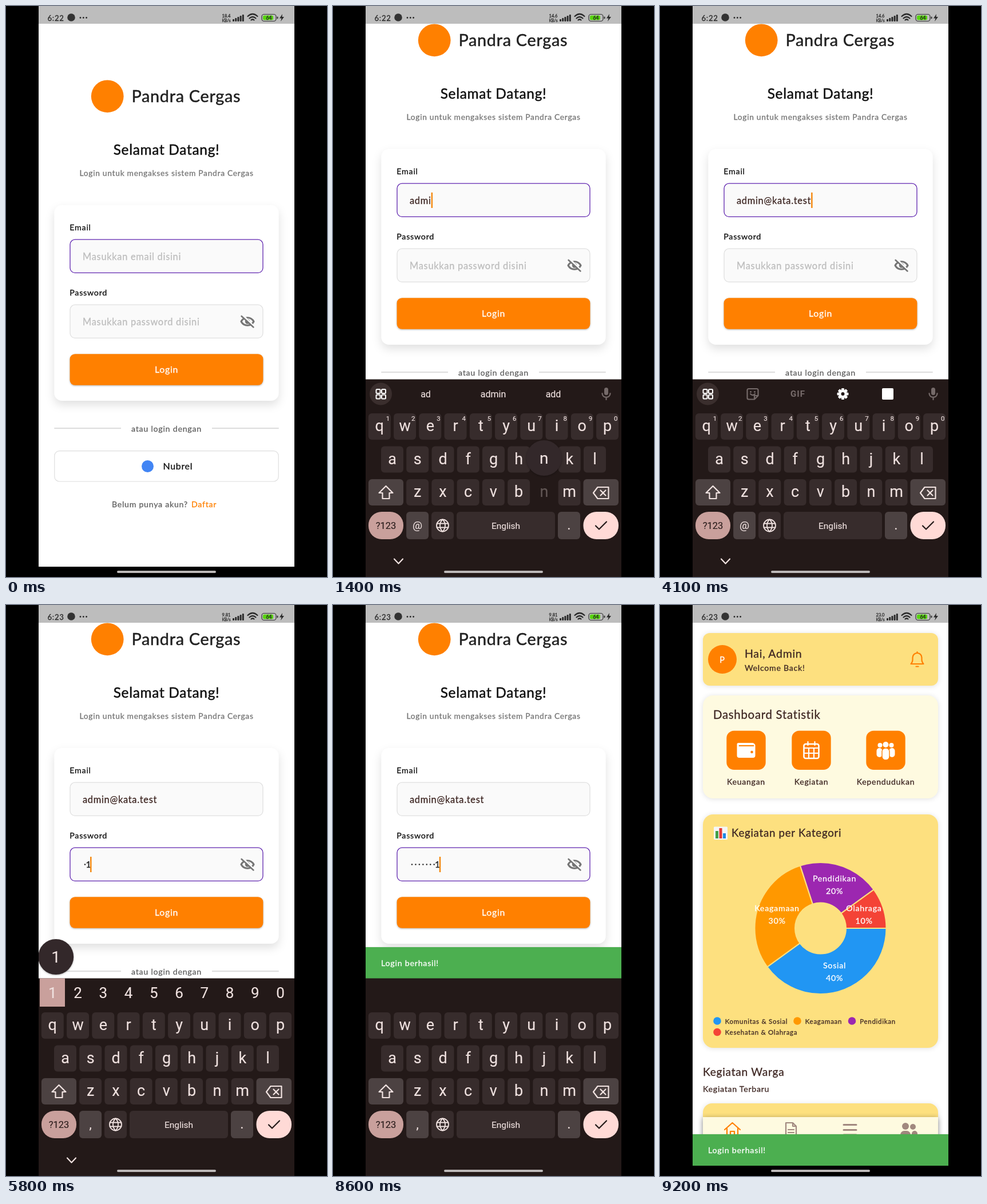
An HTML page that plays this animation: 561 by 998 pixels, repeating every 9.3 s.

```html
<!DOCTYPE html>
<html lang="id">
<head>
<meta charset="utf-8">
<title>Login</title>
<style>
  html, body { margin: 0; width: 100%; height: 100%; overflow: hidden; background: #000; }
  svg { display: block; width: 100%; height: 100%; }
  text { white-space: pre; stroke-width: .15; }
  .app { font-family: Lato, "Open Sans", sans-serif; letter-spacing: .045em; }
  .app text { stroke-width: .3; }
  .app .head { stroke-width: .5; }
  .keys { font-family: Roboto, "Noto Sans", sans-serif; }
  .mid { text-anchor: middle; }
  .line { fill: none; stroke-width: 2.2; stroke-linecap: round; stroke-linejoin: round; }
  .card { filter: drop-shadow(0 7px 8px rgba(0, 0, 0, .12)); }
  .soft { filter: drop-shadow(0 1px 4px rgba(0, 0, 0, .12)); }
  .lift { filter: drop-shadow(0 1px 1.5px rgba(0, 0, 0, .3)); }
</style>
</head>
<body>
<svg id="stage" viewBox="0 0 561 998" preserveAspectRatio="none"></svg>
<script>
const LOOP = 9300, STEP = 100;
const ORANGE = '#ff8000', YELLOW = '#fde07f', CREAM = '#fefae0', BROWN = '#3e2723';
const KEY = '#372c2c', KEY2 = '#4c4242', INK = '#f0e2e0', DIM = '#756a69', BOARD = '#231918', ROSE = '#c9a09c';
const PITCH = 44.25, BOARD_TOP = 652.5, DOT_PITCH = 6.45;
const BRAND = 'Pandra Cergas';

const text = (x, y, size, fill, str, attrs = '') =>
  `<text x="${x}" y="${y}" font-size="${size}" fill="${fill}" stroke="${fill}" ${attrs}>${str}</text>`;
const mid = (x, y, size, fill, str, attrs = '') => text(x, y, size, fill, str, `class="mid" ${attrs}`);
const rect = (x, y, w, h, r, fill, attrs = '') =>
  `<rect x="${x}" y="${y}" width="${w}" height="${h}" rx="${r}" fill="${fill}" ${attrs}/>`;
const dot = (x, y, r, fill, attrs = '') => `<circle cx="${x}" cy="${y}" r="${r}" fill="${fill}" ${attrs}/>`;
const line = (d, color, attrs = '') => `<path class="line" d="${d}" stroke="${color}" ${attrs}/>`;
const icon = (x, y, body) => `<g transform="translate(${x} ${y})">${body}</g>`;
const group = (id, body, attrs = '') => `<g id="${id}" ${attrs}>${body}</g>`;

/* Login page */
const field = (id, y) => rect(112, y, 337, 58.2, 8.6, '#fafafa', `id="${id}" stroke-width="1.3"`);

function loginPage() {
  const eye = line('M-11 0C-6-9 6-9 11 0C6 9-6 9-11 0Z', '#757575', 'style="stroke-width:3.2"') +
    dot(0, 0, 4.2, '#757575') +
    line('M-8-11L11 8', '#fafafa', 'style="stroke-width:3"') + line('M-10.5-9.5L10.5 10', '#757575', 'style="stroke-width:2.5"');
  return dot(177.2, 157.8, 28.4, ORANGE) +
    text(219.5, 168, 28.8, '#212121', BRAND, 'class="head"') +
    mid(280.5, 259.5, 24.4, '#111', 'Selamat Datang!', 'class="mid head"'.replace('class="mid head"', 'style="stroke-width:.5"')) +
    mid(280.5, 297, 13.8, '#757575', 'Login untuk mengakses sistem ' + BRAND) +
    rect(84.3, 348, 392.4, 342, 13.6, '#fff', 'class="card"') +
    text(111.3, 392, 14.3, '#111', 'Email') + field('emailBox', 408.2) +
    text(134, 443.5, 16.4, '#bdbdbd', 'Masukkan email disini', 'id="emailHint"') +
    text(134, 443.5, 16.4, BROWN, '', 'id="email"') +
    text(111.3, 506, 14.3, '#111', 'Password') + field('passBox', 522.2) +
    text(134, 557.5, 16.4, '#bdbdbd', 'Masukkan password disini', 'id="passHint"') +
    group('dots', '') + mid(0, 556.5, 15.5, '#212121', '1', 'id="lastDigit"') +
    icon(422, 551.5, eye) +
    rect(0, 0, 2.5, 27, 0, '#f58a12', 'id="caret"') +
    rect(111.6, 608.2, 337.8, 54.6, 9, ORANGE, 'class="lift"') +
    mid(280.5, 641, 15.9, '#fff', 'Login') +
    rect(84.3, 737.4, 116.7, 1.2, 0, '#c6c6c6') + rect(360, 737.4, 116.7, 1.2, 0, '#c6c6c6') +
    mid(280.5, 743.5, 14.3, '#616161', 'atau login dengan') +
    rect(84.8, 777.6, 391.4, 53.4, 8.6, '#fff', 'stroke="#dedede" stroke-width="1.2"') +
    dot(247.5, 804.5, 10.5, '#4285f4') + text(274.5, 810, 15.9, '#111', 'Nubrel') +
    text(185, 875.5, 14.2, '#616161', 'Belum punya akun?') +
    text(324, 875.5, 14.2, ORANGE, 'Daftar');
}

/* Dashboard page */
const slices = [
  ['Sosial', 40, '#2196f3', 305, 635],
  ['Keagamaan', 30, '#ff9800', 204.5, 535],
  ['Pendidikan', 20, '#9c27b0', 305, 483],
  ['Olahraga', 10, '#f44336', 356.5, 535]
];

function donut() {
  let start = 0, rings = '', gaps = '', labels = '';
  for (const [name, part, color, x, y] of slices) {
    rings += `<circle cx="280.5" cy="565" r="79.75" fill="none" stroke="${color}" stroke-width="68.5"
      pathLength="100" stroke-dasharray="${part} ${100 - part}" stroke-dashoffset="${-start}"/>`;
    gaps += `<path d="M44 0H116" stroke="${YELLOW}" stroke-width="2.2"
      transform="translate(280.5 565) rotate(${start * 3.6})"/>`;
    labels += mid(x, y, 14.3, '#fff', name) + mid(x, y + 22, 14.3, '#fff', part + '%');
    start += part;
  }
  return rings + gaps + labels;
}

function dashboard() {
  const bell = line('M-11 8H11C7 4 8 0 8-3C8-8 4-11 0-11S-8-8-8-3C-8 0-7 4-11 8ZM0-11V-13M-2 12.5H2', ORANGE);
  const wallet = rect(-16, -13, 30, 5, 2.5, '#fff') + rect(-16, -12, 32, 25, 4, '#fff') +
    line('M-12-8H13', ORANGE, 'style="stroke-width:1.8"') + dot(10, 3, 2.3, ORANGE);
  const calendar = rect(-13, -11, 26, 25, 3, 'none', 'stroke="#fff" stroke-width="2.6"') +
    line('M-12-4H12M-12 5H12M-4.5-4V13M4.5-4V13M-6-15V-9M6-15V-9', '#fff');
  const crowd = dot(-10, -9, 4, '#fff') + dot(10, -9, 4, '#fff') + dot(0, -10, 5, '#fff') +
    rect(-16, -4, 10, 16, 5, '#fff') + rect(6, -4, 10, 16, 5, '#fff') +
    rect(-6.5, -4, 13, 21, 6, '#fff', `stroke="${ORANGE}" stroke-width="1.4"`);
  const tiles = [[150.5, 'Keuangan', wallet], [264.5, 'Kegiatan', calendar], [394.5, 'Kependudukan', crowd]];
  const legend = [[100, 727, 0, 'Komunitas &amp; Sosial'], [240, 727, 1, 'Keagamaan'],
    [335.5, 727, 2, 'Pendidikan'], [100, 746.5, 3, 'Kesehatan &amp; Olahraga']];
  const bars = rect(94, 387.5, 24, 22.5, 1.5, '#f4f6f7') +
    rect(97, 395, 5, 13, 0, '#43a047') + rect(103.5, 390, 5, 18, 0, '#e53935') + rect(110, 399, 5, 9, 0, '#1e88e5');
  const grey = '#a1887f';
  const nav = line('M113 917L126.5 905L140 917M117 915V930H136V915M123 930V920H130V930', ORANGE) +
    line('M220 905H232L238 911V932H220ZM232 905V911H238M224 917H234M224 922H234', grey) +
    line('M321 908.5H343M321 917.5H343M321 926H343', grey, 'style="stroke-width:3"') +
    dot(429, 911, 6, grey) + dot(442, 912, 5, grey) +
    rect(420, 919, 18, 14, 7, grey) + rect(440, 919, 10, 14, 5, grey);

  return rect(57, 31, 447, 949, 0, '#fff') +
    rect(75, 49, 411, 92, 12, YELLOW, 'class="soft"') +
    dot(109, 95, 25, ORANGE) + mid(109, 100.5, 14.5, '#fff', 'P') +
    text(148, 92, 19.5, BROWN, 'Hai, Admin') + text(148, 115, 14.2, BROWN, 'Welcome Back!') +
    icon(449.5, 95, bell) +
    rect(75, 158, 411, 180, 18, CREAM, 'class="soft"') +
    text(93, 199, 20.4, BROWN, 'Dashboard Statistik') +
    tiles.map(([x, name, art]) => rect(x - 34.2, 219.7, 68.4, 68.4, 13, ORANGE) +
      icon(x, 254, art) + mid(x, 314, 14.1, BROWN, name)).join('') +
    rect(75, 366, 411, 408, 18, YELLOW, 'class="soft"') +
    bars + text(125, 405, 18.7, BROWN, 'Kegiatan per Kategori') + donut() +
    legend.map(([x, y, i, name]) => dot(x, y, 6.8, slices[i][2]) + text(x + 13.7, y + 4.5, 11.5, BROWN, name)).join('') +
    text(75, 823, 19.2, BROWN, 'Kegiatan Warga') + text(75, 851, 14.2, BROWN, 'Kegiatan Terbaru') +
    rect(75, 871, 411, 90, 16, YELLOW, 'class="soft"') +
    rect(75, 895, 411, 80, 0, CREAM, 'style="filter:drop-shadow(0 2px 5px rgba(0,0,0,.4))"') + nav;
}

/* Keyboard */
const spots = {};
const key = (ch, x, y, size = 27, h = 46, fill = KEY) => {
  spots[ch] = [x, y];
  return group('key-' + ch, rect(x - 19.5, y - h / 2, 39, h, 6, fill, 'class="cap"') + mid(x, y + size * .3, size, INK, ch));
};
const row = (chars, x, y) => [...chars].map((ch, i) => key(ch, x + i * PITCH, y)).join('');

function keyboard() {
  const digits = [...'1234567890'];
  const column = i => 81.3 + i * PITCH;
  digits.forEach((d, i) => { spots[d] = [column(i), 678]; });
  const grid = [[-8, -8], [1.5, -8], [-8, 1.5], [1.5, 1.5]]
    .map(([x, y]) => rect(x, y, 7, 7, 1.5, 'none', 'stroke="#fff" stroke-width="2"')).join('');
  const sticker = line('M-7-9H7Q9.5-9 9.5-6.5V3L3 9.5H-7Q-9.5 9.5-9.5 7V-6.5Q-9.5-9-7-9ZM9 3H3V9M-4 0Q0 4 4 0', DIM) +
    dot(-3.5, -3.5, 1.4, DIM) + dot(3.5, -3.5, 1.4, DIM);
  const teeth = [0, 45, 90, 135].map(a => rect(-2.6, -10, 5.2, 20, 1.5, '#fff', `transform="rotate(${a})"`)).join('');
  const gear = teeth + dot(0, 0, 7, '#fff') + dot(0, 0, 3, BOARD);
  const mic = rect(-3.5, -11, 7, 13, 3.5, DIM) + line('M-7-1C-7 8 7 8 7-1M0 6V10', DIM);
  const globe = dot(0, 0, 10.5, 'none', `stroke="${INK}" stroke-width="1.8"`) +
    line('M-10-3.5H10M-10 3.5H10M0-10.5C-6-5-6 5 0 10.5C6 5 6-5 0-10.5', INK, 'style="stroke-width:1.8"');

  return rect(57, BOARD_TOP, 447, 346, 0, BOARD) +
    group('tools', dot(83.5, 678, 19.5, '#3a2e2d') + icon(83.5, 678, grid) + icon(477.5, 678, mic) +
      group('icons', icon(162, 678, sticker) + mid(241, 683, 15, DIM, 'GIF', 'font-weight="700" letter-spacing="1"') +
        icon(319.5, 678, gear) + rect(388, 668, 20, 20, 2, '#fff')) +
      group('words', [162, 280, 385].map(x => mid(x, 683.5, 16, INK, '')).join(''))) +
    group('digits', rect(59, BOARD_TOP, 44, 49.5, 0, ROSE, 'id="digitGlow"') +
      digits.map((d, i) => mid(column(i), 687, 26, INK, d)).join('')) +
    row('qwertyuiop', 81.3, 735) +
    group('hints', digits.map((d, i) => mid(column(i) + 14.7, 725, 11.5, INK, d)).join('')) +
    row('asdfghjkl', 103.5, 792.5) + row('zxcvbnm', 147.6, 850) +
    rect(62, 827, 61, 46, 6, KEY2) + line('M92.5 839L80.5 851H86.5V861H98.5V851H104.5Z', INK) +
    rect(437.5, 827, 61.5, 46, 6, KEY2) + line('M455 851L462.5 841H481.5V861H462.5ZM467.5 846.5L476.5 855.5M476.5 846.5L467.5 855.5', INK) +
    rect(62, 884, 61, 48, 23, ROSE) + mid(92.5, 914, 16.5, '#2b1d1c', '?123') +
    key('@', 147.6, 908, 19, 48, KEY2) + key(',', 147.6, 908, 22, 48, KEY2) +
    rect(172, 884, 39, 48, 6, KEY) + icon(191.5, 908, globe) +
    rect(216, 884, 172, 48, 6, KEY) + mid(302, 913.5, 15.5, INK, 'English') +
    key('.', 412.5, 908, 24, 48, KEY2) +
    rect(437.5, 884, 61.5, 48, 23, '#ffdad6', 'id="enter"') + line('M459 908.5L465 914.5L478 901.5', '#231918') +
    line('M107 966.5L114.5 974.5L122 966.5', INK, 'id="chevron"') +
    group('popup', dot(0, 0, 31, '#33282a', 'class="lift"') + mid(0, 9.5, 28, INK, '') + mid(0, 23, 15, INK, '...', 'font-weight="700"'));
}

function statusBar() {
  const ink = '#2a2a2a';
  const bars = [4, 6, 8, 10, 12].map((h, i) => rect(396 + i * 4.2, 27 - h, 3, h, 1, ink)).join('');
  return rect(57, 0, 447, 31, 0, '#bdbdbd') +
    text(72.5, 25.5, 13.2, ink, '', 'id="clock"') +
    dot(114, 20, 6.8, '#333') + [130, 135.3, 140.6].map(x => dot(x, 20.5, 1.4, ink)).join('') +
    mid(385, 20, 7.5, ink, '', 'id="speed" letter-spacing="0"') + mid(385, 27.5, 7, ink, 'KB/s', 'letter-spacing="0"') + bars +
    line('M422.5 18Q431 10 439.5 18M425.5 21.5Q431 16.5 436.5 21.5M428.5 24.5Q431 22.5 433.5 24.5', ink) +
    rect(447, 14.5, 25, 12, 4, '#bdbdbd', 'stroke="#333" stroke-width="1.2"') + rect(449, 16.5, 18, 8, 2.5, '#57d40f') +
    rect(473.5, 18.5, 2, 4, 1, '#333') + mid(459.5, 23.7, 8.5, '#222', '64', 'letter-spacing="0"') +
    `<path d="M483 14L478 21.5H481.5L480 27L486 19H482.5Z" fill="${ink}"/>`;
}

const stage = document.getElementById('stage');
stage.innerHTML = `<clipPath id="screen"><rect x="57" width="447" height="998"/></clipPath>
  <g clip-path="url(#screen)">` +
  rect(57, 31, 447, 949, 0, '#fff') +
  group('login', loginPage(), 'class="app"') +
  rect(57, 980, 447, 18, 0, '#000') +
  group('home', dashboard(), 'class="app"') +
  group('snack', rect(57, 0, 447, 55, 0, '#4caf50', 'class="lift"') + text(84, 33, 14.3, '#fff', 'Login berhasil!'), 'class="app"') +
  group('board', keyboard(), 'class="keys"') +
  group('status', statusBar(), 'class="app"') +
  rect(194, 987, 173, 4, 2, '#bcb8b8') + '</g>';

const el = id => document.getElementById(id);
const show = (id, on) => { el(id).style.display = on ? '' : 'none'; };
const shift = (id, y) => el(id).setAttribute('transform', `translate(0 ${y})`);
const place = (id, x, y) => { el(id).setAttribute('x', x); el(id).setAttribute('y', y); };

/* Timelines: [start, value] */
const at = (list, t) => list.reduce((v, [start, value]) => t >= start ? value : v, list[0][1]);
const emailText = [[0, ''], [800, 'a'], [1100, 'ad'], [1200, 'adm'], [1400, 'admi'], [1500, 'admin'],
  [2400, 'admin@'], [3000, 'admin@k'], [3200, 'admin@ka'], [3600, 'admin@kata.test']];
const passCount = [[0, 0], [5500, 1], [5800, 2], [6100, 3], [6500, 4], [6600, 5], [6700, 6], [6800, 7], [7600, 8]];
const presses = [[0, ''], [700, 'a'], [800, ''], [1000, 'd'], [1100, 'm'], [1200, ''], [1300, 'i'], [1400, 'n'], [1500, ''],
  [2300, '@'], [2400, ''], [2900, 'k'], [3000, ''], [3100, 'a'], [3200, ''],
  [5400, '1'], [5500, ''], [5700, '1'], [5900, ''], [6000, '1'], [6100, ''], [6500, '1'], [6900, ''], [7500, '1'], [7700, '']];
const wordSets = [[0, ''], [1100, 'ad,admin,add'], [1500, 'admin,admins,adm'], [2400, ''], [3000, 'ka,kata,kali'], [3700, '']];
const speeds = [[0, '18.4'], [1300, '14.6'], [5000, '9.81'], [9000, '23.0']];
let pressed = '';

function pressKey(ch) {
  const style = (name, cap, ink) => {
    const k = el('key-' + name);
    if (!k) return;
    k.querySelector('.cap').style.opacity = cap;
    k.querySelector('text').style.opacity = ink;
  };
  if (pressed) style(pressed, 1, 1);
  if (ch) style(ch, 0, .3);
  pressed = ch;
  show('popup', ch);
  show('digitGlow', ch === '1');
  if (!ch) return;
  const [x, y] = spots[ch];
  const [label, more] = el('popup').querySelectorAll('text');
  el('popup').setAttribute('transform', `translate(${Math.min(473, Math.max(87.2, x))} ${y - (ch === '1' ? 63 : 60)})`);
  label.textContent = ch;
  more.style.display = ch === 'a' ? '' : 'none';
}

function draw(t) {
  const rise = t < 100 ? 0 : 1 - (1 - Math.min(1, t / 500)) ** 2;
  const boardTop = 998 - (998 - BOARD_TOP) * rise;
  const onPass = t >= 4700, secret = t >= 4800, digitRow = t >= 5000;

  el('clock').textContent = digitRow ? '6:23' : '6:22';
  el('speed').textContent = at(speeds, t);

  // The page is centred in the room left above the keyboard.
  shift('login', -Math.min(98, Math.max(0, 980 - boardTop) / 2));
  shift('board', boardTop - BOARD_TOP);
  show('board', t >= 100 && t < 8800);

  const mail = at(emailText, t), count = at(passCount, t);
  el('email').textContent = mail;
  show('emailHint', !mail);
  show('passHint', !count);
  el('emailBox').setAttribute('stroke', onPass ? '#e0e0e0' : '#6025b0');
  el('passBox').setAttribute('stroke', onPass ? '#6025b0' : '#e0e0e0');

  const masked = Math.max(0, count - 1);
  el('dots').innerHTML = Array.from({ length: masked }, (_, i) => dot(138 + i * DOT_PITCH, 551.5, 1.2, '#212121')).join('');
  show('lastDigit', count);
  el('lastDigit').setAttribute('x', 137.8 + masked * DOT_PITCH);
  const mailEnd = mail ? 134 + el('email').getComputedTextLength() : 134.5;
  const passEnd = count ? 140.6 + masked * DOT_PITCH : 134.5;
  place('caret', onPass ? passEnd : mailEnd, onPass ? 538 : 424);
  show('caret', t >= 100 && !(t >= 2000 && t < 2300));

  const words = at(wordSets, t);
  show('icons', !words);
  show('words', words);
  el('words').querySelectorAll('text').forEach((n, i) => { n.textContent = words.split(',')[i] || ''; });
  show('tools', !digitRow);
  show('digits', digitRow && t < 8500);
  show('hints', !secret);
  show('key-@', !secret);
  show('key-,', secret);
  show('chevron', t < 8500);
  el('enter').setAttribute('fill', t >= 4600 && t < 4700 ? '#e3bdb9' : '#ffdad6');
  pressKey(at(presses, t));

  show('snack', t >= 8500);
  shift('snack', t >= 9000 ? 925 : t >= 8600 ? 598 : 625);
  show('home', t >= 9000);
  el('home').style.opacity = Math.min(1, .45 + (t - 9000) / 200 * .55);
}

// Selamat Datang and the brand share the heavier heading stroke.
let last = -1;
function tick() {
  const t = Math.floor(performance.now() % LOOP / STEP) * STEP;
  if (t !== last) draw(last = t);
  requestAnimationFrame(tick);
}
tick();
</script>
</body>
</html>
```
